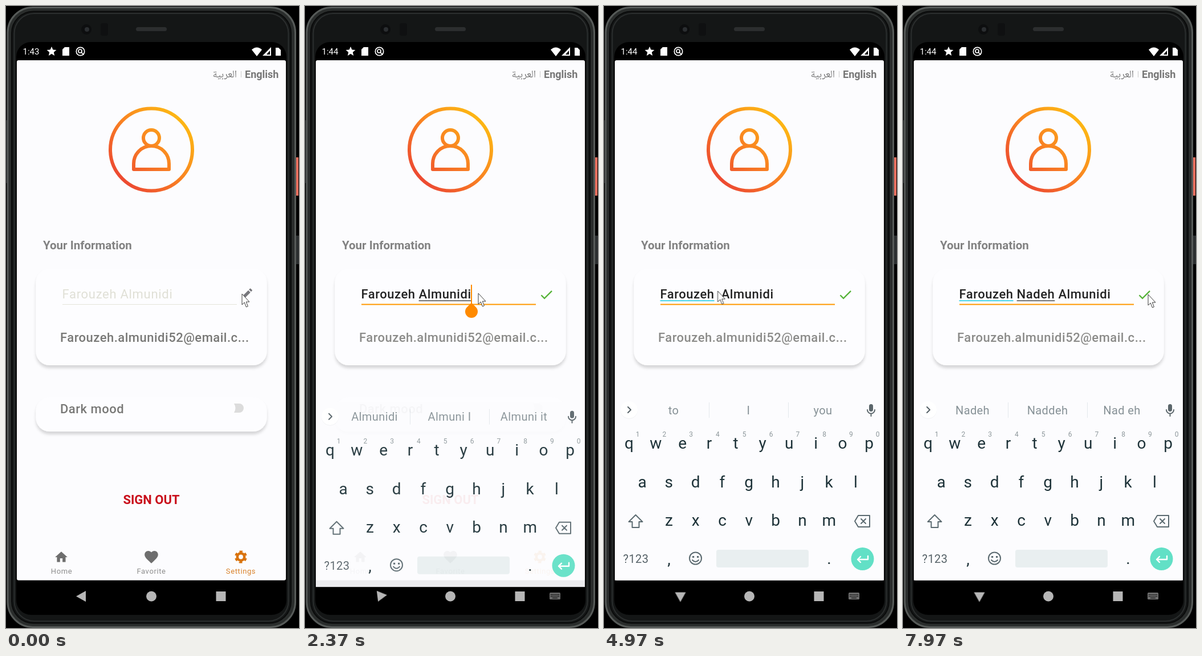
Animation of 514 by 1089 pixels, one loop 8 s. Source, as an HTML page:

```html
<!DOCTYPE html>
<html lang="en">
<head>
<meta charset="utf-8">
<title>Profile settings</title>
<style>
html, body { margin: 0; width: 100%; height: 100%; overflow: hidden; background: #000; }
body { position: relative; font-family: Roboto, sans-serif; }
svg { position: absolute; left: 0; top: 0; display: block; }
.mid { text-anchor: middle; }
.label { font-size: 22px; font-weight: 500; letter-spacing: .5px; fill: #8b8b89; }
.idle .label { fill: #787876; }
.tab { font-size: 13px; letter-spacing: .6px; fill: #8e8e8e; }
.key { font-size: 28px; fill: #1d3238; }
.num { font-size: 12px; fill: #8d979b; }
.hint { font-size: 20px; letter-spacing: .4px; fill: #869196; }
.line { fill: none; stroke-linecap: round; stroke-linejoin: round; }

#name { position: absolute; left: 98.5px; top: 488px; height: 34px; line-height: 34px;
  font-size: 22px; font-weight: 500; letter-spacing: .55px; white-space: pre; color: #222; }
.idle #name { color: #e0e0d6; font-weight: 400; letter-spacing: .7px; }
u { text-decoration: underline 1.5px #777; text-underline-offset: 2.5px; text-decoration-skip-ink: none; }
u.kept { text-decoration-color: #4dd7ea; }
.caret { position: absolute; top: 0; width: 2px; height: 34px; margin-left: -1px; }
.caret.on { background: #ff8a00; }
.grip::after { content: ""; position: absolute; left: -10px; top: 36px; width: 22px; height: 22px;
  border-radius: 0 50% 50% 50%; transform: rotate(45deg); background: #ff8a00; }

#rule { stroke: #8c8c8c; stroke-width: 1; }
.idle #rule { stroke: #e4e4da; }
.focus #rule { stroke: #ff9800; stroke-width: 2; }
#pencil, .idle #check { display: none; }
.idle #pencil { display: block; }

#mouse { animation: roam 8s infinite ease-in-out; }
#keys { animation: rise 8s infinite, fade 8s infinite; }
#ime { animation: fade 8s infinite; }
#back { transform-origin: 133.5px 1033px; animation: spin 8s infinite; }
@keyframes roam {
  0%, 10.9% { transform: translate(414px, 504px); }
  18.8%, 21.25% { transform: translate(322px, 504px); }
  25.6%, 32.5% { transform: translate(304px, 503px); }
  40.6% { transform: translate(199.5px, 499px); }
  86.5% { transform: translate(199.5px, 499px); animation-timing-function: ease-in; }
  87.5% { transform: translate(335px, 502px); animation-timing-function: ease-out; }
  89.2%, 100% { transform: translate(430px, 505px); }
}
@keyframes rise {
  0%, 28.375% { transform: translateY(96px); animation-timing-function: cubic-bezier(.215, .61, .355, 1); }
  30.875%, 100% { transform: none; }
}
@keyframes fade {
  0%, 28.375% { opacity: 0; animation-timing-function: cubic-bezier(.215, .61, .355, 1); }
  30.4%, 100% { opacity: 1; }
}
@keyframes spin {
  0%, 28.375% { transform: rotate(0); animation-timing-function: cubic-bezier(.25, .46, .45, .94); }
  31.7%, 100% { transform: rotate(270deg); }
}
</style>
</head>
<body class="idle">
<svg width="514" height="1089" viewBox="0 0 514 1089">
  <defs>
    <linearGradient id="warm" gradientUnits="userSpaceOnUse" x1="200" y1="308" x2="310" y2="196">
      <stop offset="0" stop-color="#ec4632"/><stop offset=".5" stop-color="#f98222"/><stop offset="1" stop-color="#fdb913"/>
    </linearGradient>
    <filter id="lift" x="-10%" y="-20%" width="120%" height="150%">
      <feDropShadow dx="0" dy="5" stdDeviation="2.6" flood-color="#000" flood-opacity=".15"/>
    </filter>
  </defs>

  <!-- phone -->
  <path d="M508 402h6v50h-6z" fill="#2c2f30"/>
  <path d="M508 265h5v67h-5z" fill="#f0705f"/>
  <path d="M0 200h3v110H0z" fill="#222425"/>
  <rect x="3" y="2.500" width="504.500" height="1085" rx="44" fill="#2a2d2c" stroke="#565a58" stroke-width="3"/>
  <rect x="10" y="9.500" width="490" height="1071" rx="38" fill="#141616" stroke="#0a0b0b" stroke-width="2"/>
  <rect x="14.500" y="13" width="481" height="1064" rx="35" fill="none" stroke="#2b2e2e" stroke-width="2"/>
  <circle cx="141" cy="41" r="9" fill="#0d0e0f"/><circle cx="142" cy="41" r="4" fill="#2b2e31"/>
  <rect x="166" y="30" width="13" height="22" rx="4" fill="#0f1011"/>
  <rect x="228" y="37" width="54" height="7" rx="3.500" fill="#2c2e2f"/>
  <rect x="18" y="63" width="474" height="1003" rx="26"/>

  <!-- status bar -->
  <g fill="#fff">
    <text id="clock" x="29.500" y="85" font-size="15">1:43</text>
    <path d="M80 71l2.400 5.600 6 .5-4.600 4 1.400 5.900-5.200-3.200-5.200 3.200 1.400-5.900-4.600-4 6-.5z"/>
    <path d="M103 72h8v15H99V76z"/>
    <path d="M440 88l-9-11.500q9-8 18 0zM465 72v15h-15zM473 73h5l4 4v10h-9z"/>
    <path d="M463 78v7h-6z" fill="#000"/>
    <g class="line" stroke="#fff" stroke-width="1.7"><circle cx="130.500" cy="79.500" r="7.200"/><circle cx="130" cy="79" r="3"/><path d="M132 81l4 4"/></g>
  </g>

  <!-- page -->
  <rect x="19" y="95" width="472" height="910.500" rx="3" fill="#fcfcfe"/>
  <text x="405" y="125" font-size="18" text-anchor="end" fill="#777" font-family="Noto Naskh Arabic, Noto Sans Arabic, DejaVu Sans, sans-serif">العربية</text>
  <path d="M412.500 114v11" stroke="#ccc"/>
  <text x="419" y="126" font-size="18" font-weight="700" fill="#767676">English</text>
  <g class="line" stroke="url(#warm)" stroke-width="6">
    <circle cx="255" cy="251.500" r="72"/><circle cx="255" cy="231" r="14"/>
    <path d="M224 286v-10a31 31 0 0 1 62 0v10z"/>
  </g>
  <text x="65" y="426" font-size="20.500" font-weight="700" fill="#828282">Your Information</text>
  <g fill="#fdfdff" filter="url(#lift)">
    <rect x="52.500" y="460" width="405" height="169" rx="24"/>
    <rect x="52.500" y="685" width="405" height="60" rx="24"/>
  </g>
  <path id="rule" d="M99 522.500H405"/>
  <path id="pencil" transform="translate(411 491.500)" fill="#77777c" d="M3 17.250V21h3.750L17.810 9.940l-3.750-3.750zM20.710 7.040a1 1 0 0 0 0-1.410l-2.340-2.340a1 1 0 0 0-1.410 0l-1.830 1.830 3.750 3.750z"/>
  <path id="check" transform="translate(409.700 491.600) scale(1.150)" fill="#55b338" d="M9 16.170L4.830 12l-1.420 1.410L9 19 21 7l-1.410-1.410z"/>
  <text class="label" x="95" y="588">Farouzeh.almunidi52@email.c...</text>
  <text class="label" x="95" y="713">Dark mood</text>
  <path d="M400 696h9a8 8 0 0 1 0 16h-9q5-8 0-16z" fill="#dcdcdc"/>
  <text class="mid" x="255" y="871.500" font-size="22" font-weight="700" fill="#c9101c">SIGN OUT</text>
  <g fill="#6e6e6e">
    <path transform="translate(84 952) scale(1.08)" d="M10 20v-6h4v6h5v-8h3L12 3 2 12h3v8z"/>
    <path transform="translate(240.800 950.500) scale(1.180)" d="M12 21.350l-1.450-1.320C5.400 15.360 2 12.280 2 8.500 2 5.420 4.420 3 7.500 3c1.740 0 3.410.810 4.500 2.090C13.090 3.810 14.760 3 16.500 3 19.580 3 22 5.420 22 8.500c0 3.780-3.400 6.860-8.550 11.540z"/>
  </g>
  <g transform="translate(412 964.500)" fill="none" stroke="#d9730d">
    <circle r="6.200" stroke-width="4.600"/>
    <circle r="9" stroke-width="4" pathLength="12" stroke-dasharray="1 1" transform="rotate(15)"/>
  </g>
  <g class="mid">
    <text class="tab" x="97.500" y="994">Home</text><text class="tab" x="255" y="994">Favorite</text>
    <text class="tab" x="412" y="994" style="fill:#d9822b">Settings</text>
  </g>

  <!-- keyboard -->
  <g id="keys">
    <path d="M19 682H491V1005.500H19z" fill="#fcfcfe"/>
    <circle cx="44" cy="708" r="15" fill="#f1f2f4"/><circle cx="44" cy="707" r="15" fill="#fff"/>
    <path class="line" d="M42 702l5 5-5 5" stroke="#566268" stroke-width="2"/>
    <path id="bars" d="M184.500 694v27M323.500 694v27" stroke="#e4e8ec"/>
    <g id="hints" class="mid"></g>
    <rect x="465" y="697" width="7" height="13" rx="3.500" fill="#5b666b"/>
    <path class="line" d="M462 707a6.500 6.500 0 0 0 13 0M468.500 714v4" stroke="#5b666b" stroke-width="2"/>
    <g id="letters" class="mid"></g>
    <g class="line" stroke="#5b6a70" stroke-width="2">
      <path d="M55.500 891l12 12h-6v10h-12v-10h-6z"/>
      <path d="M446 892h20v20h-20l-6-10zM451 898l8 8m0-8l-8 8"/>
      <circle cx="160.500" cy="967" r="10.500"/><path d="M155 970q5.500 6 11 0"/>
    </g>
    <path d="M155 963h3.200v3H155zM163 963h3.200v3H163z" fill="#5b6a70"/>
    <text class="mid" x="56" y="975" font-size="20" letter-spacing=".4" fill="#566268">?123</text>
    <text class="key mid" x="114" y="978">,</text><text class="key mid" x="395" y="977">.</text>
    <rect x="197" y="952" width="162" height="31" rx="4" fill="#e9eff0"/>
    <circle cx="453.500" cy="968" r="20" fill="#62e0c6"/>
    <path class="line" d="M463 963v6h-18m5-5l-5 5 5 5" stroke="#fff" stroke-width="2.400"/>
  </g>

  <!-- navigation bar -->
  <g fill="#b6b6b6">
    <path id="back" d="M123 1033.500L140 1024v19z"/>
    <circle cx="255" cy="1033.500" r="9"/><path d="M368.500 1025h17v17h-17z"/>
    <g id="ime">
      <rect x="429" y="1027" width="19" height="12" rx="1.500" fill="#6f6f6f"/>
      <path d="M431 1030.500h15M431 1033.500h15" stroke="#000" stroke-width="1.500" stroke-dasharray="1.500 1.200"/>
      <path d="M434 1036.500h9" stroke="#000"/>
    </g>
  </g>
</svg>

<div id="name"></div>

<svg width="514" height="1089" viewBox="0 0 514 1089">
  <path id="mouse" d="M0 0V19L4.300 15 7.400 23 10.400 21.800 7.300 14H13z" fill="#fff" stroke="#3a3a3a"/>
</svg>

<script>
const LOOP = 8000, EDIT = 450, FOCUS = 2150;
const first = "Farouzeh", last = "Almunidi", middle = "Nadeh";
const $ = id => document.getElementById(id);
const svgText = (parent, cls, x, y, s = "") => {
  const el = document.createElementNS("http://www.w3.org/2000/svg", "text");
  el.setAttribute("class", cls);
  el.setAttribute("x", x);
  el.setAttribute("y", y);
  el.textContent = s;
  return parent.appendChild(el);
};

[["qwertyuiop", 44, 775], ["asdfghjkl", 67, 843], ["zxcvbnm", 114, 910]].forEach(([row, x, y], r) =>
  [...row].forEach((c, i) => {
    svgText($("letters"), "key", x + i * 46.8, y, c);
    if (!r) svgText($("letters"), "num", x + 15 + i * 46.8, 754, (i + 1) % 10);
  }));
const hints = [122, 253.5, 384].map(x => svgText($("hints"), "hint", x, 714.5));

// Each step: start time, name with | as the caret, suggestions, grip shown
const kept = `<u class="kept">${first}</u>`;
const typed = n => `${kept} <u>${middle.slice(0, n)}</u>| ${last}`;
const steps = [
  [0, `${first} ${last}`, []],
  [FOCUS, `${first} <u>${last}</u>|`, [last, "Almuni I", "Almuni it"], true],
  [3470, `<u>${first}</u>| ${last}`, ["", first, ""], true],
  [4300, `${kept} | ${last}`, ["to", "I", "you"]],
  ...[5170, 5370, 5580, 5790].map((at, i) => [at, typed(i + 1), ["", middle.slice(0, i + 1), ""]]),
  [6040, typed(5), [middle, "Naddeh", "Nad eh"]]
];

let shown = "", begin;
function draw(now) {
  begin ??= now;
  const t = (now - begin) % LOOP;
  const [at, text, words, grip] = steps.findLast(s => s[0] <= t);
  const blink = (t - at) % 1000 < 500;
  const mode = t < EDIT ? "idle" : t < FOCUS ? "edit" : "focus";
  const state = [at, blink, mode].join();
  if (state !== shown) {
    shown = state;
    document.body.className = mode;
    $("clock").textContent = t < EDIT ? "1:43" : "1:44";
    $("name").innerHTML = text.replace("|", `<i class="caret${blink ? " on" : ""}${grip ? " grip" : ""}"></i>`);
    hints.forEach((h, i) => h.textContent = words[i] || "");
    $("bars").style.display = words[0] ? "" : "none";
  }
  requestAnimationFrame(draw);
}
requestAnimationFrame(draw);
</script>
</body>
</html>
```
